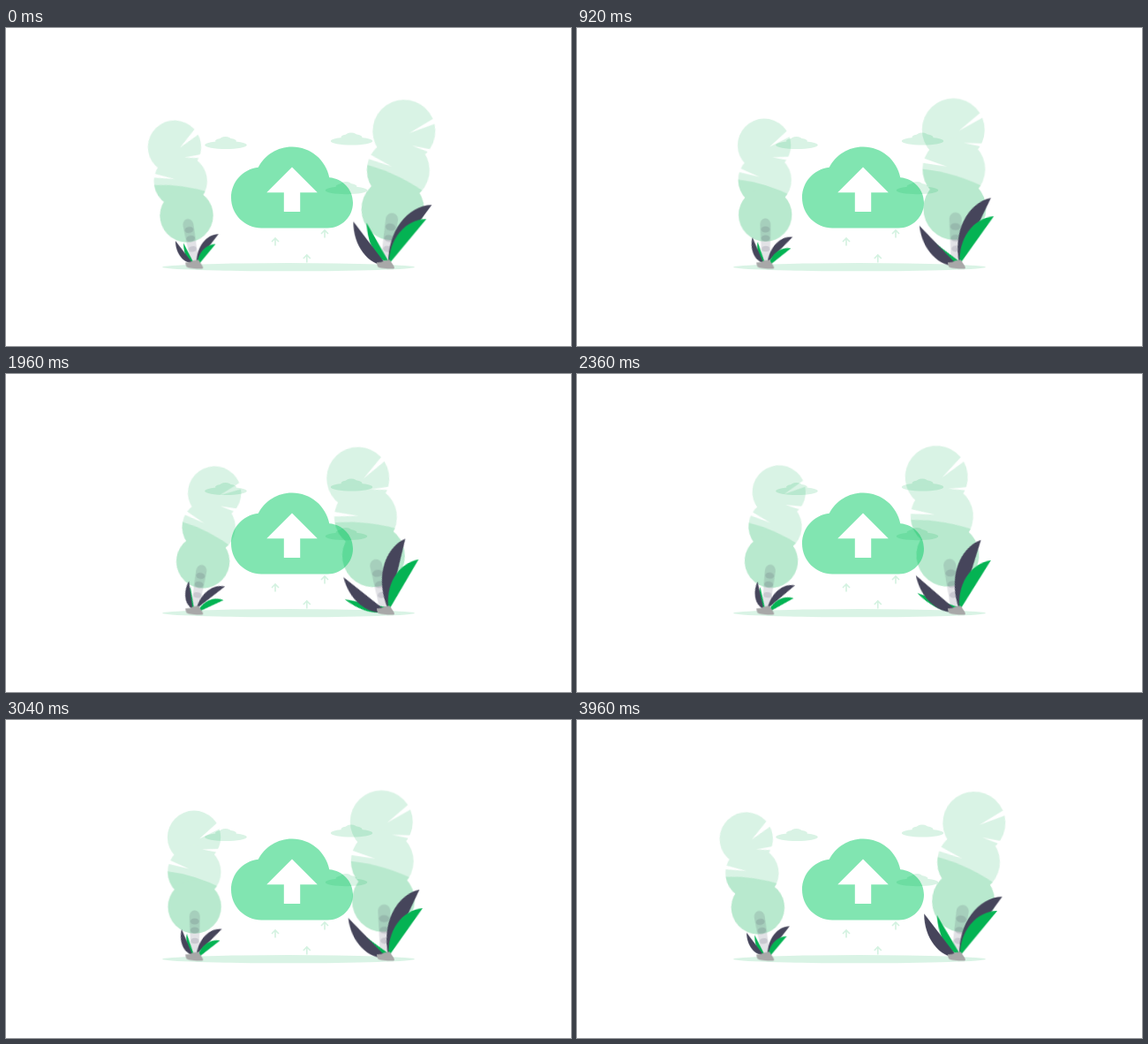
These frames come from a looping animation (640 by 360 pixels, 4000 ms). An HTML page:

```html
<!DOCTYPE html>
<html lang="en">
<head>
<meta charset="utf-8">
<title>Cloud upload</title>
<style>
  html, body { margin: 0; width: 100%; height: 100%; overflow: hidden; background: #fff; }
  svg { display: block; width: 100%; height: 100%; }
  .tint { fill: #00b14f; opacity: .15; }
  .bark { fill: #3f3d56; opacity: .15; }
  .dark { fill: #46455b; }
  .green { fill: #04b353; }
  .rock { fill: #a8a8a8; }
  .sway {
    transform-origin: 0 0;
    animation: sway 2s linear infinite alternate;
  }
  @keyframes sway {
    from { transform: rotate(var(--from)); }
    to { transform: rotate(var(--to)); }
  }
</style>
</head>
<body>
<svg viewBox="0 0 640 360">
  <defs>
    <!-- Trees are drawn relative to the foot of the trunk. -->
    <mask id="notchesLeft" maskUnits="userSpaceOnUse" x="-60" y="-190" width="120" height="200">
      <path fill="#fff" d="M-60-190H60V10H-60z"/>
      <path d="M6-131.5 28-151 32-144zM9-119.5 31-120 29-115.5zM-6-97.5-31-109-32-104z"/>
    </mask>
    <mask id="notchesRight" maskUnits="userSpaceOnUse" x="-60" y="-210" width="120" height="220">
      <path fill="#fff" d="M-60-210H60V10H-60z"/>
      <path d="M1.5-152 28-175 32-169.5zM7-138.5 33-138 30-134zM-11.5-111.2-41-121.5-41-115.5z"/>
    </mask>
    <clipPath id="shadeLeft"><path d="M-34-95.5Q2-91 34-74V0H-34z"/></clipPath>
    <clipPath id="shadeRight"><path d="M-41-108.5Q0-105 39-85V0H-41z"/></clipPath>

    <g id="crownLeft" mask="url(#notchesLeft)">
      <circle cy="-133.2" r="30.2"/>
      <circle cy="-94" r="30.2"/>
      <circle cy="-54.5" r="30.2"/>
    </g>
    <g id="crownRight" mask="url(#notchesRight)">
      <circle cx="-4.8" cy="-153.2" r="35.5"/>
      <circle cx="-3.6" cy="-108.4" r="35.5"/>
      <circle cx="-2" cy="-63.9" r="35.5"/>
    </g>

    <g id="puff">
      <ellipse rx="23.7" ry="4.5"/>
      <ellipse cy="-4.5" rx="12" ry="3.5"/>
      <ellipse cx="-.5" cy="-5.3" rx="7" ry="4.3"/>
    </g>
    <path id="arrow" d="M-4 0 0-4 4 0M0-4V4.5"/>

    <!-- Leaves: an elliptic outer edge closed by a straight chord, base at the origin. -->
    <path id="leftLarge" d="M-107.7-139.4c0 77 48.2 139.4 107.7 139.4z"/>
    <path id="leftSmall" d="M-68.7-132.4c0 73.2 30.8 132.4 68.7 132.4z"/>
    <path id="rightLarge" d="M0 0c0-99.6 62.2-180.2 138.9-180.2z"/>
    <path id="rightSmall" d="M0 0c0-77.9 53.7-140.9 120.2-140.9z"/>
    <path id="stone" class="rock" d="M0 0s15.3-.5 19.9-3.8 23.6-7.2 24.7-1.9 23 26.2 5.7 26.3-40.1-2.7-44.7-5.5S0 0 0 0z"/>
  </defs>

  <ellipse class="tint" cx="320" cy="270.7" rx="143" ry="4.6"/>

  <g transform="translate(214 266)">
    <g class="sway" style="--from:-10deg;--to:10deg">
      <g class="tint"><use href="#crownLeft"/></g>
      <g class="tint"><g clip-path="url(#shadeLeft)"><use href="#crownLeft"/></g></g>
      <path class="bark" d="M-6-43C-6-53 6-53 6-43L4.5 2H-4.5z"/>
      <g class="bark">
        <ellipse cy="-38" rx="5" ry="3.5"/>
        <ellipse cy="-28" rx="5" ry="3.5"/>
        <ellipse cy="-16" rx="4.500" ry="3.300"/>
      </g>
    </g>
  </g>

  <g transform="translate(429 268.4)">
    <g class="sway" style="--from:10deg;--to:-10deg">
      <g class="tint"><use href="#crownRight"/></g>
      <g class="tint"><g clip-path="url(#shadeRight)"><use href="#crownRight"/></g></g>
      <path class="bark" d="M-8-52C-8-62 6-62 6-52L5 1H-5z"/>
      <g class="bark">
        <ellipse cx="-1" cy="-43.5" rx="5.8" ry="4"/>
        <ellipse cx="-.5" cy="-30.5" rx="5.5" ry="4"/>
        <ellipse cy="-18.5" rx="5" ry="3.5"/>
      </g>
    </g>
  </g>

  <g transform="translate(255 111.5) scale(5.75)">
    <path fill="#05cb65" opacity=".5" d="M19.35 10.04C18.67 6.59 15.64 4 12 4 9.11 4 6.6 5.64 5.35 8.04 2.34 8.36 0 10.91 0 14c0 3.31 2.69 6 6 6h13c2.76 0 5-2.24 5-5 0-2.64-2.05-4.78-4.65-4.96z"/>
    <path fill="#fff" d="M13.6 13v3.77h-3.2V13H7l5-5 5 5z"/>
  </g>

  <g class="tint"><use href="#puff" x="249" y="132.5"/></g>
  <g class="tint"><use href="#puff" x="391.5" y="128"/></g>
  <g class="tint"><use href="#puff" x="385.5" y="183.7"/></g>

  <g fill="none" stroke="#00b14f" stroke-width="1.6" opacity=".17">
    <use href="#arrow" x="305" y="242"/>
    <use href="#arrow" x="361" y="233"/>
    <use href="#arrow" x="340.8" y="261"/>
  </g>

  <g transform="translate(213.4 267.4) scale(.18)">
    <use href="#leftSmall" class="green sway" style="--from:0deg;--to:18deg"/>
  </g>
  <g transform="translate(211.4 266.3) scale(.181)">
    <use href="#leftLarge" class="dark sway" style="--from:0deg;--to:30.7deg"/>
  </g>
  <g transform="translate(215.7 265.7) scale(.18)">
    <use href="#rightLarge" class="dark sway" style="--from:0deg;--to:14.7deg"/>
  </g>
  <g transform="translate(216.5 270) scale(.178)">
    <use href="#rightSmall" class="green sway" style="--from:-1deg;--to:25deg"/>
  </g>
  <use href="#stone" transform="translate(203.3 265.5) scale(.35)"/>

  <g transform="translate(433.5 264.5) scale(.34)">
    <use href="#leftSmall" class="green sway" style="--from:-2.2deg;--to:-52.7deg"/>
  </g>
  <g transform="translate(431.3 269) scale(.356)">
    <use href="#leftLarge" class="dark sway" style="--from:.6deg;--to:-14.1deg"/>
  </g>
  <g transform="translate(433 266.7) scale(.363)">
    <use href="#rightLarge" class="dark sway" style="--from:-1deg;--to:-24.5deg"/>
  </g>
  <g transform="translate(433.7 267.2) scale(.358)">
    <use href="#rightSmall" class="green sway" style="--from:-.6deg;--to:-10.2deg"/>
  </g>
  <use href="#stone" transform="translate(420 265.5) scale(.35)"/>
</svg>
</body>
</html>
```
